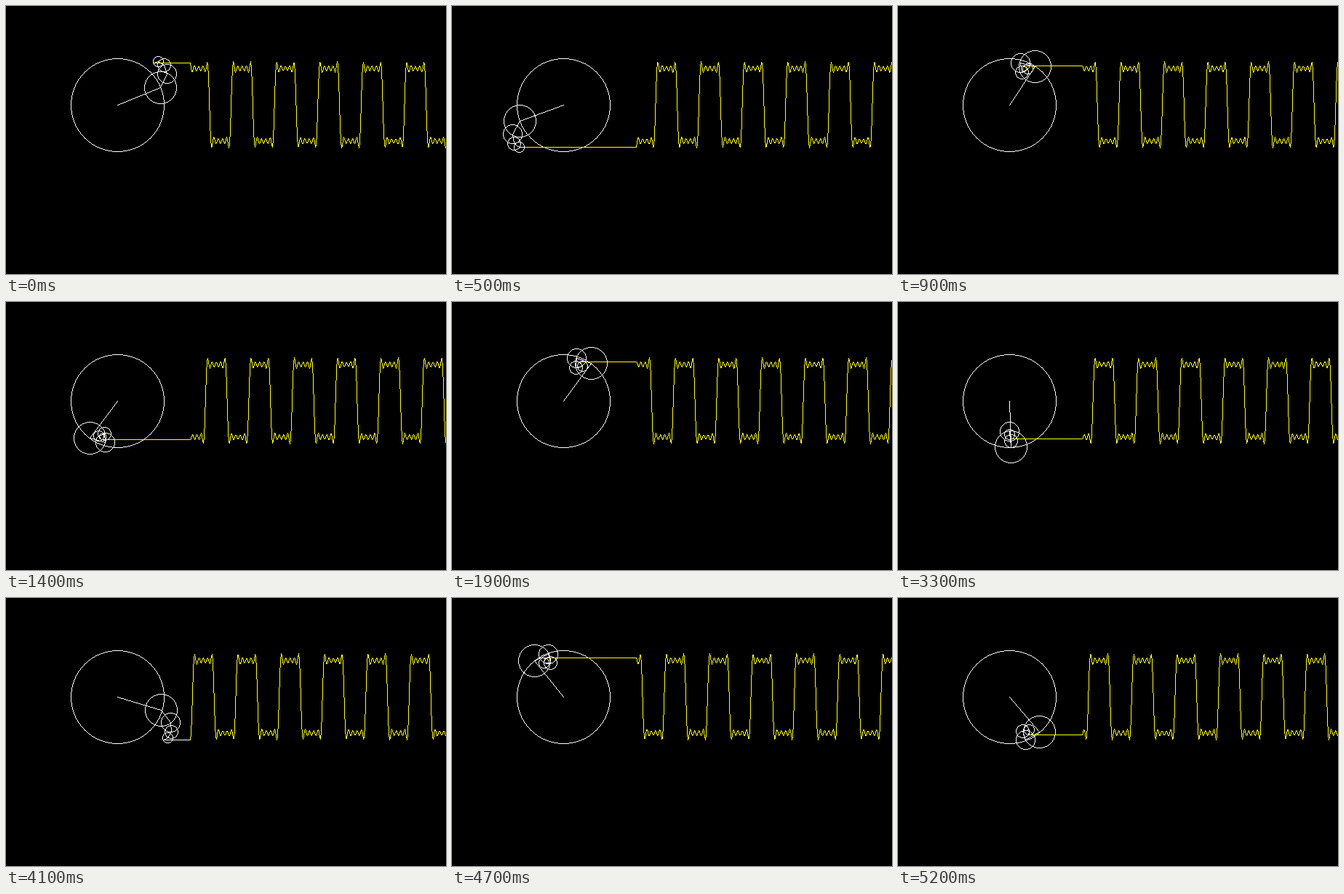
These frames come from a looping animation (605 px wide and 369 px high, 5300 ms). A matplotlib script:

```python
import numpy as np
import matplotlib.pyplot as plt
from matplotlib.animation import FuncAnimation

W, H, DPI = 605, 369, 64
FRAMES, INTERVAL = 53, 100
CX, CY = 153, 136
WAVE_X = 253
PERIOD = 59.6           # wavelength in pixels
LEVEL = 50              # half height of the square wave
WHITE, YELLOW = (255, 255, 255), (255, 255, 0)

ODD = np.array([1, 3, 5, 7, 9])
RADII = 4 * LEVEL / (np.pi * ODD)

# The rotation runs at about one turn per second, slightly unevenly.
KEY_FRAMES = [0, 9, 19, 25, 33, 41, 52]
KEY_ANGLES = [-21.4, 304.4, 666.7, 890, 1168, 1457.3, 1849.8]

fig = plt.figure(figsize=(W / DPI, H / DPI), dpi=DPI, facecolor="black")
ax = fig.add_axes([0, 0, 1, 1])
ax.axis("off")
canvas = np.zeros((H, W, 3), np.uint8)
picture = ax.imshow(canvas, aspect="auto", interpolation="nearest")

wave_x = np.arange(WAVE_X, W)


def whole(values):
    return np.floor(values).astype(int)


def dots(x, y, color):
    inside = (x >= 0) & (x < W) & (y >= 0) & (y < H)
    canvas[y[inside], x[inside]] = color


def polyline(xs, ys, color):
    """Hard-edged line, one pixel wide, through whole-pixel points."""
    xs, ys = whole(xs), whole(ys)
    for x0, y0, x1, y1 in zip(xs, ys, xs[1:], ys[1:]):
        t = np.linspace(0, 1, max(abs(x1 - x0), abs(y1 - y0)) + 1)
        dots(whole(x0 + (x1 - x0) * t + 0.5),
             whole(y0 + (y1 - y0) * t + 0.5), color)


def circle(x, y, radius, color):
    """Hard-edged outline built from eight mirrored arcs."""
    x, y, r = whole(x), whole(y), whole(radius + 0.8)
    half = round(r / np.sqrt(2))
    k = np.arange(-half, half + 1)
    edge = whole(np.sqrt(r * r - k * k) + 0.5)
    for side in (-edge, edge):
        dots(x + k, y + side, color)
        dots(x + side, y + k, color)


def height(angle):
    return CY + np.sin(np.multiply.outer(angle, ODD)) @ RADII


def draw(frame):
    angle = np.radians(np.interp(frame, KEY_FRAMES, KEY_ANGLES))
    xs = CX + np.append(0, np.cumsum(RADII * np.cos(ODD * angle)))
    ys = CY + np.append(0, np.cumsum(RADII * np.sin(ODD * angle)))

    canvas[:] = 0
    for x, y, r in zip(xs, ys, RADII):
        circle(x, y, r, WHITE)
    polyline(xs, ys, WHITE)

    # The link turns white while the wave is near an edge.
    near_edge = abs(np.sin(angle)) < 1 / 3
    polyline(np.array([xs[-1], WAVE_X]), ys[[-1, -1]],
             WHITE if near_edge else YELLOW)

    phase = angle - 2 * np.pi * (wave_x - WAVE_X) / PERIOD
    polyline(wave_x, height(phase), YELLOW)
    picture.set_data(canvas)
    return [picture]


anim = FuncAnimation(fig, draw, frames=FRAMES, interval=INTERVAL,
                     repeat=True, repeat_delay=0, blit=False)
plt.show()
```
